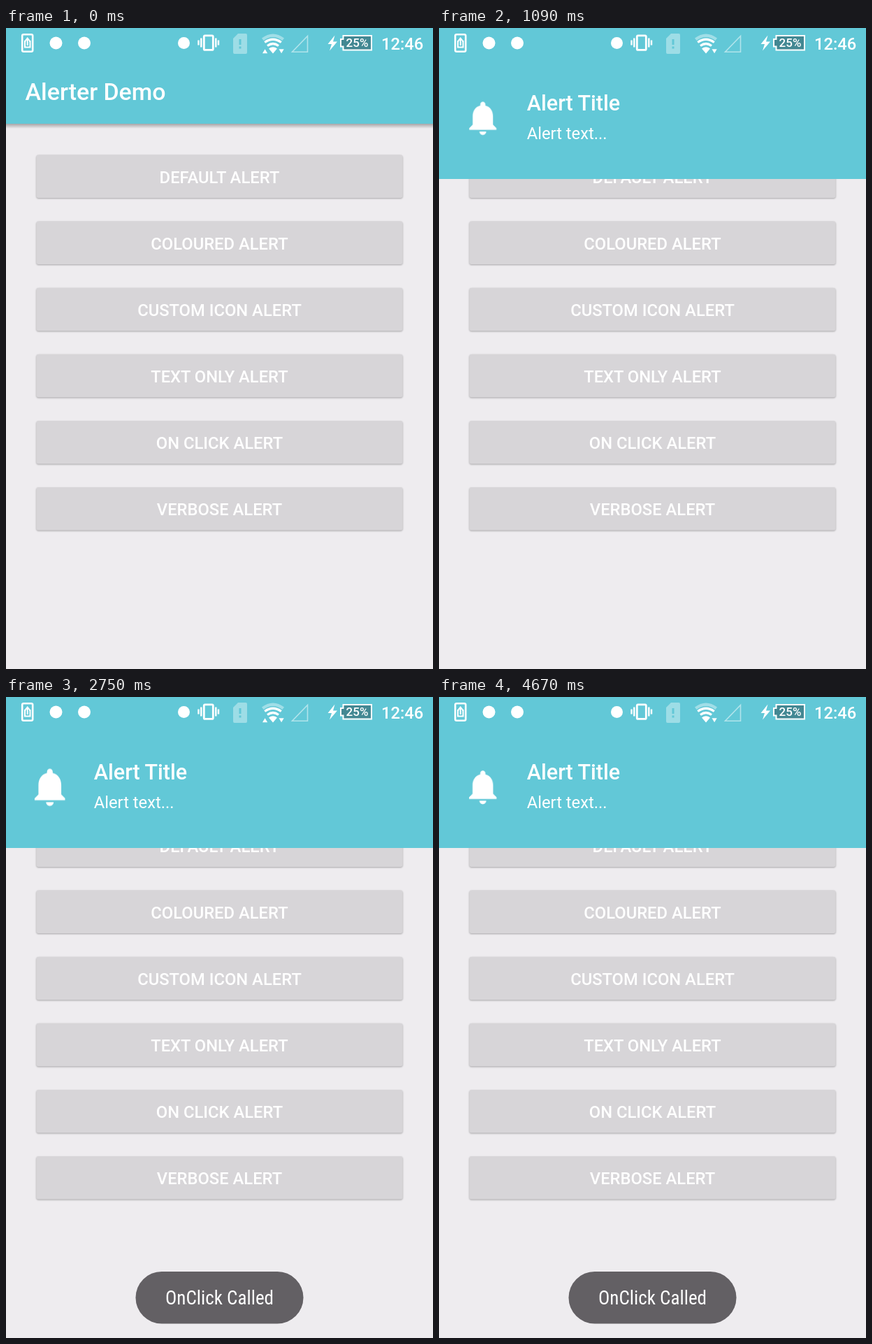
An HTML page for the animation above (4710 ms loop, 611 px wide and 917 px high).

```html
<!DOCTYPE html>
<html lang="en">
<head>
<meta charset="utf-8">
<title>Alerter Demo</title>
<style>
  html, body { margin: 0; width: 100%; height: 100%; overflow: hidden; background: #eeecef; }
  svg { display: block; width: 611px; height: 917px; font-family: Roboto, sans-serif; fill: #fff; }
  .medium { font-weight: 500; }
  .teal { fill: #62c8d7; }
  .line { fill: none; stroke: #fff; }
  .button rect { fill: #d7d5d8; filter: drop-shadow(0 1.5px 1px rgba(0, 0, 0, .3)); }
  .button text { font-size: 23.76px; text-anchor: middle; }

  #alert, #bell, #tint, #ripple, #toast, #upload { animation: 4710ms linear infinite; }
  #alert { animation-name: drop; }
  #bell { animation-name: pulse; transform-origin: 62.7px 129.3px; }
  #tint { animation-name: tint; }
  #ripple { animation-name: ripple; }
  #toast { animation-name: toast; }
  #upload { animation-name: blink; }

  /* overshoot with tension 2 */
  @keyframes drop {
    0%, 5.669% { transform: translateY(-311px); animation-timing-function: cubic-bezier(.3333, 1.6667, .6667, 1); }
    16.285%, 100% { transform: none; }
  }
  @keyframes pulse {
    0%, 16.285%, 38.22%, 58.28%, 81.95% { transform: none; animation-timing-function: cubic-bezier(.37, 0, .63, 1); }
    28.03%, 46.5%, 70.06% { transform: scale(.83); animation-timing-function: cubic-bezier(.37, 0, .63, 1); }
    93.84% { transform: scale(.83); animation-timing-function: cubic-bezier(.37, 0, .8, .7); }
    100% { transform: scale(.92); }
  }
  @keyframes tint {
    0%, 28.5% { opacity: 0; }
    32.5%, 36% { opacity: .035; }
    41%, 100% { opacity: 0; }
  }
  @keyframes ripple {
    0%, 29.7% { transform: translate(330px, 48px) scale(0); opacity: .05; }
    34.61% { transform: translate(324px, 53px) scale(282); opacity: .05; }
    36.5% { transform: translate(318px, 62px) scale(330); opacity: .04; }
    41%, 100% { transform: translate(305px, 70px) scale(350); opacity: 0; }
  }
  @keyframes toast {
    0%, 31.85% { opacity: 0; animation-timing-function: cubic-bezier(.37, 0, .63, 1); }
    42.46%, 100% { opacity: 1; }
  }
  @keyframes blink {
    0%, 23.99% { opacity: 1; animation-timing-function: step-end; }
    6.37% { opacity: 0; animation-timing-function: step-end; }
    95.54%, 100% { opacity: 0; animation-timing-function: step-end; }
  }
</style>
</head>
<body>
<svg viewBox="0 0 611 917">
  <defs>
    <linearGradient id="shade" x2="0" y2="1">
      <stop stop-opacity=".3"/>
      <stop offset="1" stop-opacity="0"/>
    </linearGradient>
    <clipPath id="card"><rect y="-200" width="611" height="416"/></clipPath>
  </defs>

  <g id="buttons"></g>

  <rect y="137" width="611" height="7" fill="url(#shade)"/>
  <rect class="teal" width="611" height="137"/>
  <text class="medium" x="27.5" y="103" font-size="33.9">Alerter Demo</text>

  <g id="alert">
    <g clip-path="url(#card)">
      <rect class="teal" y="-200" width="611" height="416"/>
      <g id="bell">
        <path transform="translate(62.7 129.3) scale(2.72) translate(-12 -12.25)" d="M12 22c1.1 0 2-.9 2-2h-4c0 1.1.89 2 2 2zm6-6v-5c0-3.07-1.64-5.64-4.5-6.32V4c0-.83-.67-1.5-1.5-1.5s-1.5.67-1.5 1.5v.68C7.63 5.36 6 7.92 6 11v5l-2 2v1h16v-1l-2-2z"/>
      </g>
      <text class="medium" x="125.7" y="118" font-size="30.5">Alert Title</text>
      <text x="125.7" y="159" font-size="23.76">Alert text...</text>
      <rect id="tint" y="-200" width="611" height="416" fill="#000"/>
      <circle id="ripple" r="1" fill="#000"/>
    </g>
  </g>

  <g id="status">
    <rect class="line" x="23.2" y="9.2" width="15" height="24.6" rx="2" stroke-width="2.6"/>
    <path class="line" stroke-width="2" d="M28.5 19H27v8.5h7.5V19H33M30.7 25v-8"/>
    <path d="M30.7 13l4 5h-8z"/>
    <circle cx="71.5" cy="21.5" r="9"/>
    <circle cx="112" cy="21.5" r="9"/>
    <circle cx="254.5" cy="21.5" r="8.5"/>

    <rect class="line" x="283.3" y="10.8" width="13" height="20.6" rx="1.5" stroke-width="2.8"/>
    <path class="line" stroke-width="2.4" d="M279.3 14.5v13M275.5 17.5v7M300.3 14.5v13M304 17.5v7"/>

    <path opacity=".38" fill-rule="evenodd" d="M332 8h11q2 0 2 2v25q0 2-2 2h-16q-2 0-2-2V15zM333.5 16v8h3v-8zm0 10.500v3h3v-3z"/>

    <path opacity=".4" d="M366 14.500q16-12 32 0l-2.600 3.500q-13.400-10-26.800 0z"/>
    <path class="line" stroke-width="3.200" d="M370.200 20.500q11.800-8.500 23.600 0M374 25.500q8-6 16 0"/>
    <path d="M376 29.500q6-4.500 12 0l-6 7z"/>
    <path id="upload" d="M367 36.200l3.600-6 3.600 6z"/>
    <path d="M390.500 30.200h7.200l-3.600 6z"/>

    <path class="line" opacity=".5" stroke-width="1.600" d="M431.500 11.500v22.700h-22z"/>
    <path d="M470.500 10.500l-10 12.500h5.500l-3 9.500 11-13h-6z"/>
    <path fill="#438893" stroke="#fff" stroke-width="2" d="M482.500 11h40.500v20.500h-40.500v-5h-3.500v-10.500h3.500z"/>
    <text class="medium" x="502.500" y="27.300" font-size="17" text-anchor="middle">25%</text>
    <text class="medium" x="537" y="30.500" font-size="23.760">12:46</text>
  </g>

  <g id="toast">
    <rect x="185.500" y="822" width="240" height="74.500" rx="37.200" fill="#636064"/>
    <text x="305.500" y="869" font-size="27.100" text-anchor="middle" style="font-family: 'Roboto Condensed', Roboto, sans-serif; font-stretch: 75%">OnClick Called</text>
  </g>
</svg>
<script>
  const labels = ['DEFAULT', 'COLOURED', 'CUSTOM ICON', 'TEXT ONLY', 'ON CLICK', 'VERBOSE'];
  document.getElementById('buttons').innerHTML = labels.map((label, i) => `
    <g class="button" transform="translate(0 ${i * 95.1})">
      <rect x="43.5" y="181.5" width="524" height="61.5" rx="3"/>
      <text class="medium" x="305.5" y="221.5">${label} ALERT</text>
    </g>`).join('');
</script>
</body>
</html>
```
